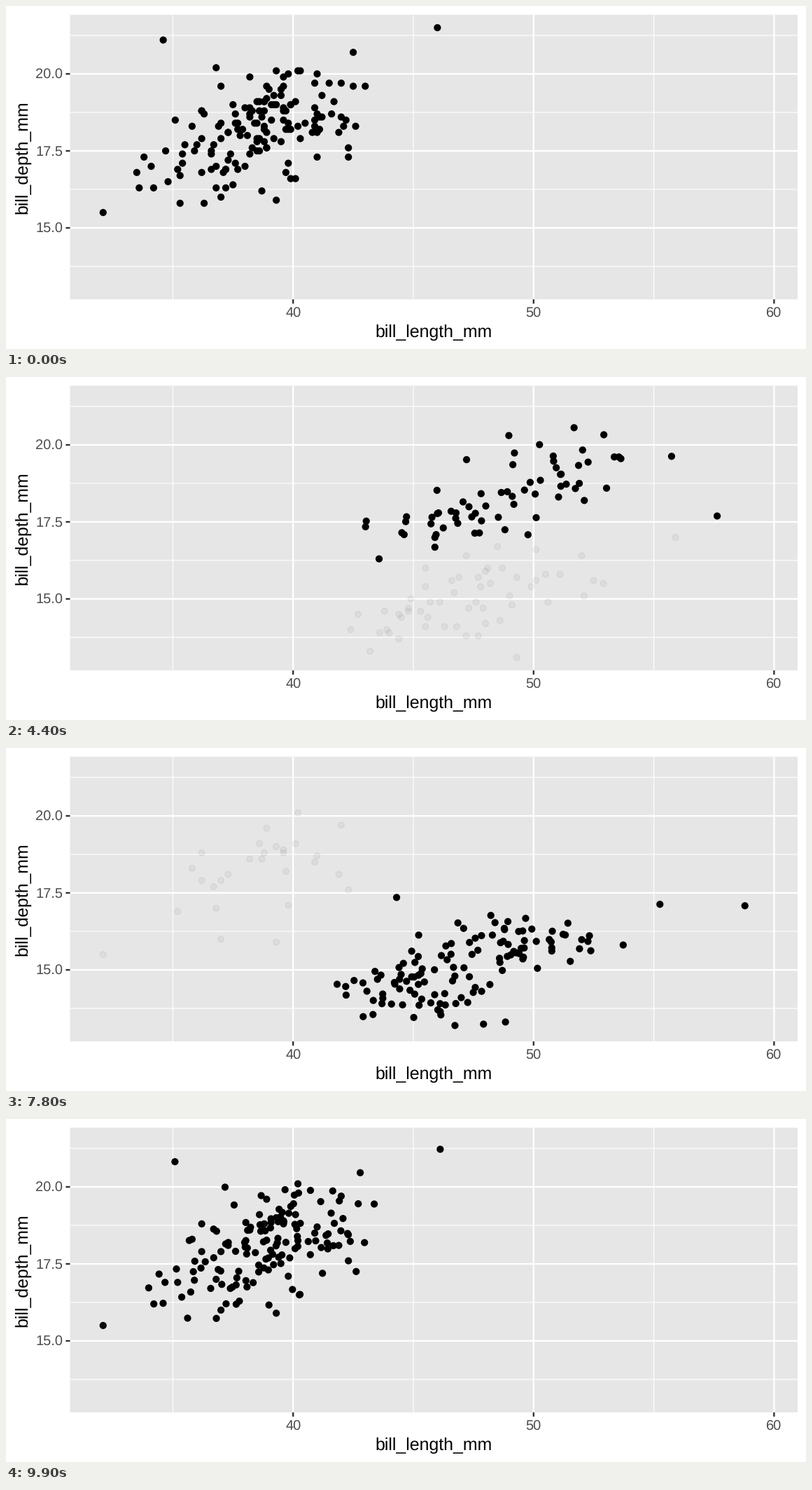
A matplotlib script that plays this animation: 1143x490 px, repeating every 10 s.

```python
import matplotlib.pyplot as plt
import numpy as np
from matplotlib.animation import FuncAnimation
from matplotlib.patches import Rectangle

W, H, DPI = 1143, 490, 64
PT = 160 / DPI  # plot sizes are given in points at 160 pixels per inch
FRAMES, INTERVAL = 100, 100

plt.rcParams["font.family"] = "Liberation Sans"
plt.rcParams["text.hinting"] = "none"

# Panel in pixels and its data limits
LEFT, RIGHT, TOP, BOTTOM = 91.5, 1130.9, 12.5, 419.1
XMIN, XMAX, YMIN, YMAX = 30.725, 60.975, 12.68, 21.92

rng = np.random.default_rng(21)


def cloud(count, mean, gap, noise, keys):
    """Scattered points that alternate between a small and a large group.

    keys maps a row to the outlying point that stands there.
    """
    side = np.where(np.arange(count) % 2, 1, -1)[:, None]
    jitter = rng.normal(size=(count, 2)).clip(-2.1, 2.1)
    points = np.array(mean) + side * gap + jitter * noise
    for row, point in keys.items():
        points[row] = point
    return points.round(1)


# The three states; a row is the same dot in each of them
A = cloud(151, (38.7, 18.2), (1.4, 0.6), (1.85, 0.85), {
    17: (42.5, 20.7), 33: (40.9, 18.9), 19: (46.0, 21.5), 37: (42.2, 18.5),
    14: (34.6, 21.1), 63: (41.1, 18.2), 80: (41.0, 20.0),
    130: (32.1, 15.5), 140: (40.2, 20.1)})
C = cloud(68, (48.6, 18.3), (2.1, 0.75), (1.7, 0.7), {
    17: (58.0, 17.8), 33: (51.0, 18.8), 19: (49.2, 18.2), 37: (52.0, 20.7),
    14: (45.9, 17.1), 63: (55.8, 19.8)})
G = cloud(123, (47.3, 14.95), (1.8, 0.65), (1.8, 0.6), {
    17: (49.2, 15.2), 33: (59.6, 17.0), 19: (48.7, 15.1), 37: (44.4, 17.3),
    14: (45.8, 14.6), 63: (54.3, 15.7), 80: (55.9, 17.0)})

# Last resting frame, number of steps, from, to
MOVES = [(9, 24, A, C), (43, 24, C, G), (77, 23, G, A)]


def px(x):
    return LEFT + (x - XMIN) / (XMAX - XMIN) * (RIGHT - LEFT)


def py(y):
    return BOTTOM - (y - YMIN) / (YMAX - YMIN) * (BOTTOM - TOP)


def pose(frame):
    """Points and their opacity; shared rows glide, new ones fade in."""
    src, dst, t = A, A, 1
    for start, steps, a, b in MOVES:
        if frame > start:
            src, dst, t = a, b, min((frame - start) / steps, 1)
    if t == 1:
        return dst, np.ones(len(dst))
    n = min(len(src), len(dst))
    moving = src[:n] + t * (dst[:n] - src[:n])
    leaving, entering = src[n:], dst[n:]
    alpha = np.ones(n + len(leaving) + len(entering))
    alpha[n + len(leaving):] = t
    return np.vstack([moving, leaving, entering]), alpha


fig = plt.figure(figsize=(W / DPI, H / DPI), dpi=DPI, facecolor="white")
ax = fig.add_axes([0, 0, 1, 1])
ax.set(xlim=(0, W), ylim=(H, 0))
ax.axis("off")


def line(xs, ys, color, width, z):
    ax.plot(xs, ys, color=color, lw=width * PT, zorder=z, snap=False,
            solid_capstyle="butt")


def label(x, y, text, size, color, ha="center", **kw):
    ax.text(x, y, text, fontsize=size * PT, color=color, ha=ha,
            va="baseline", **kw)


ax.add_patch(Rectangle((LEFT, TOP), RIGHT - LEFT, BOTTOM - TOP,
                       fc="#e6e6e6", lw=0, zorder=0, snap=False))

for x in (35, 45, 55):
    line([px(x)] * 2, [TOP, BOTTOM], "white", 0.53, 1)
for y in (13.75, 16.25, 18.75, 21.25):
    line([LEFT, RIGHT], [py(y)] * 2, "white", 0.53, 1)
for x in (40, 50, 60):
    line([px(x)] * 2, [TOP, BOTTOM], "white", 1.07, 2)
    line([px(x)] * 2, [BOTTOM, BOTTOM + 6.1], "#333333", 1.07, 2)
    label(px(x), 444.8, str(x), 9, "#4d4d4d")
for y in (15, 17.5, 20):
    line([LEFT, RIGHT], [py(y)] * 2, "white", 1.07, 2)
    line([LEFT - 6.1, LEFT], [py(y)] * 2, "#333333", 1.07, 2)
    label(81, py(y) + 7, f"{y:.1f}", 9, "#4d4d4d", ha="right")

label((LEFT + RIGHT) / 2 - 0.5, 472.5, "bill_length_mm", 11.2, "black")
label(30.3, (TOP + BOTTOM) / 2, "bill_depth_mm", 11.2, "black",
      rotation=90, rotation_mode="anchor")

dots = ax.scatter([], [], s=(3.9 * PT) ** 2, linewidths=0.7 * PT, zorder=3)


def update(frame):
    points, alpha = pose(frame)
    colors = np.zeros((len(points), 4))
    colors[:, 3] = alpha
    dots.set_offsets(np.column_stack([px(points[:, 0]), py(points[:, 1])]))
    dots.set_facecolors(colors)
    dots.set_edgecolors(colors)
    return [dots]


anim = FuncAnimation(fig, update, frames=FRAMES, interval=INTERVAL,
                     init_func=lambda: update(0), repeat=True, repeat_delay=0)
plt.show()
```
